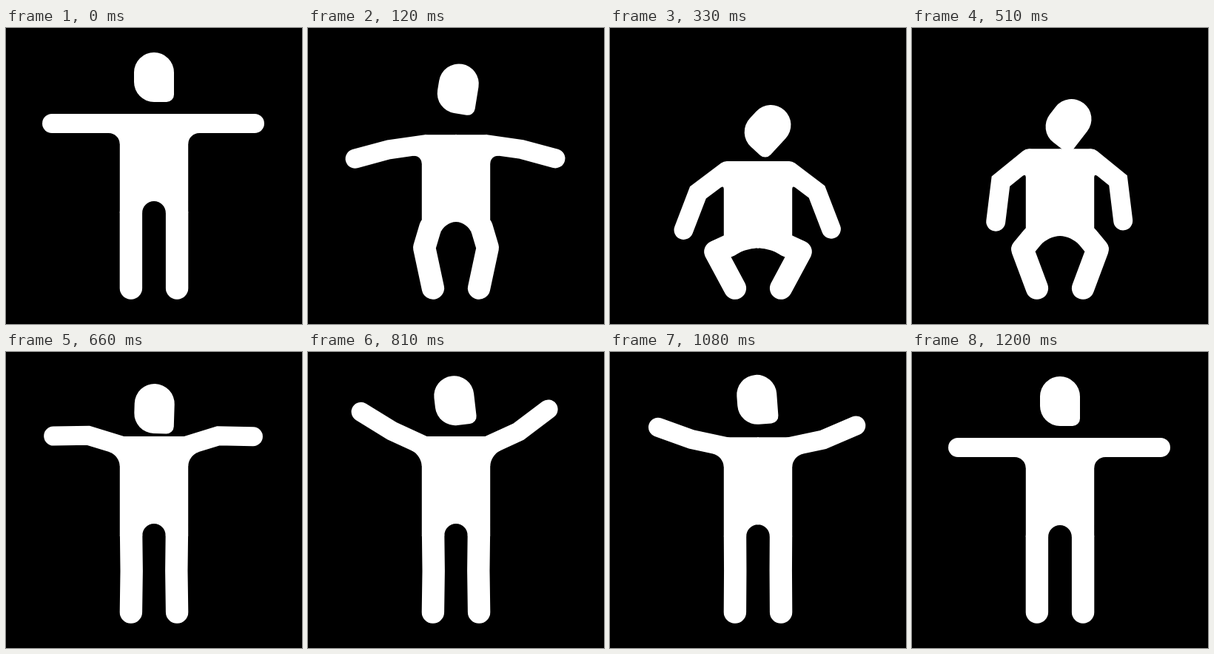
These frames come from a looping animation (400 by 400 pixels, 3.23 s). An HTML page with a canvas:

```html
<!DOCTYPE html>
<html lang="en">
<head>
<meta charset="utf-8">
<title>Jumping figure</title>
<style>
  html, body { margin: 0; width: 100%; height: 100%; overflow: hidden; background: #000; }
  canvas { display: block; width: 400px; height: 400px; }
</style>
</head>
<body>
<canvas id="stage"></canvas>
<script>
const LOOP = 3230, STEP = 30, END = 1200;
const ARM = 26, LEG = 30.4, SHIN = 56;
const SIDE = 153.8, SHOULDER = 158, HIP = 168.9, FOOT = 351.6;

// The motion: stand, crouch, spring up with raised arms, stand. Angles point down when positive.
const times = [0, 210, 330, 510, 660, 960, 1180];
const motion = {
  crouch: [0, 0.83, 1, 0.74, -0.03, -0.03, 0],
  headY: [60, 96, 131, 123, 70, 55, 60],
  upper: [0, 19, 37, 39, -17, -27.5, 0],
  fore: [0, 35, 69, 83, 1, -46, 0]
};

// The arms differ a little in length and in how far they lift.
const left = { upper: 49, lift: 1 };
const right = { upper: 47, lift: 1.17 };

const canvas = document.getElementById("stage");
const ctx = canvas.getContext("2d");
const ratio = window.devicePixelRatio || 1;
canvas.width = canvas.height = 400 * ratio;

const rad = deg => deg * Math.PI / 180;
const clamp = (x, lo, hi) => Math.min(hi, Math.max(lo, x));

function slope(v, i) {
  if (i === 0 || i === v.length - 1) return 0;
  const rate = n => (v[n + 1] - v[n]) / (times[n + 1] - times[n]);
  const a = rate(i - 1), b = rate(i);
  return a * b > 0 ? 2 * a * b / (a + b) : 0;
}

// Smooth curve through the values, without overshoot.
function at(v, t) {
  let i = 0;
  while (i < times.length - 2 && t >= times[i + 1]) i++;
  const span = times[i + 1] - times[i], u = clamp((t - times[i]) / span, 0, 1), w = 1 - u;
  return v[i] * w * w * (1 + 2 * u) + v[i + 1] * u * u * (3 - 2 * u) +
    span * u * w * (w * slope(v, i) - u * slope(v, i + 1));
}

const headShape = new Path2D(
  "M-27 0A27 27 0 0 1 27 0V30A10 10 0 0 1 17 40H0A27 27 0 0 1-27 13Z");

function limb(width, join, points) {
  ctx.lineWidth = width;
  ctx.lineJoin = join;
  ctx.beginPath();
  points.forEach(p => ctx.lineTo(...p));
  ctx.stroke();
}

// Near-circular bend from a to b, rounding the corner at c.
function bend(a, c, b) {
  const pull = (p, n) => p[n] + (c[n] - p[n]) * 0.5523;
  ctx.bezierCurveTo(pull(a, 0), pull(a, 1), pull(b, 0), pull(b, 1), ...b);
}

function drawArm(top, upper, fore, side) {
  const a = rad(upper), b = rad(fore < 0 ? fore * side.lift : fore);
  const s = [SHOULDER, top + 13], dx = -Math.cos(a), dy = Math.sin(a);
  const reach = 47 + 8 * Math.sin(b) ** 2;
  const elbow = [s[0] + side.upper * dx, s[1] + side.upper * dy];
  const hand = [elbow[0] - reach * Math.cos(b), elbow[1] + reach * Math.sin(b)];
  limb(ARM, "miter", [s, elbow, hand]);

  // Rounded armpit
  const q = [s[0] + 13 * dy, s[1] - 13 * dx];
  const corner = [SIDE, q[1] + (SIDE - q[0]) / dx * dy];
  const r = clamp(15 - 0.3 * upper, 5, 15);
  const start = [SIDE + r * dx, corner[1] + r * dy], end = [SIDE, corner[1] + r];
  ctx.beginPath();
  ctx.moveTo(...start);
  bend(start, corner, end);
  ctx.lineTo(...s);
  ctx.fill();
}

function drawBody(top, crouch) {
  const crotch = 234 + 63.5 * crouch;
  const hip = [HIP - 8 * crouch, 250 + 44 * crouch];
  const out = 26.5 * crouch;
  const knee = [HIP - out, FOOT - Math.sqrt(SHIN * SHIN - out * out)];
  limb(LEG, "round", [hip, knee, [HIP, FOOT]]);

  // Follow the inner edge of the thigh up to the crotch arch.
  const len = Math.hypot(knee[0] - hip[0], knee[1] - hip[1]);
  const kx = (knee[0] - hip[0]) / len, ky = (knee[1] - hip[1]) / len;
  const edge = [hip[0] + LEG / 2 * ky, hip[1] - LEG / 2 * kx];
  const px = Math.min(188, edge[0] + (crotch - edge[1]) / ky * kx), r = 200 - px;
  const mid = [200, crotch], inner = [px + r * kx, crotch + r * ky];
  ctx.beginPath();
  ctx.moveTo(SHOULDER, top);
  ctx.lineTo(201, top);
  ctx.lineTo(201, crotch);
  ctx.lineTo(...mid);
  bend(mid, [px, crotch], inner);
  ctx.lineTo(...edge);
  ctx.lineTo(...hip);
  ctx.lineTo(SIDE, hip[1] - 8 * crouch);
  ctx.lineTo(SIDE, top + 13);
  ctx.fill();
}

function draw(t) {
  const crouch = at(motion.crouch, t), headY = at(motion.headY, t);
  const upper = at(motion.upper, t), fore = at(motion.fore, t);
  const top = 116 + 64 * crouch;
  const tilt = 0.6 * (headY - 60) + 0.25 * Math.min(0, upper);

  ctx.setTransform(ratio, 0, 0, ratio, 0, 0);
  ctx.fillStyle = "#000";
  ctx.fillRect(0, 0, 400, 400);
  ctx.fillStyle = ctx.strokeStyle = "#fff";
  ctx.lineCap = "round";

  for (const side of [left, right]) {
    ctx.save();
    if (side === right) ctx.transform(-1, 0, 0, 1, 400, 0);
    drawArm(top, upper, fore, side);
    drawBody(top, crouch);
    ctx.restore();
  }

  ctx.translate(200 + 0.41 * tilt, headY);
  ctx.rotate(rad(tilt));
  ctx.fill(headShape);
}

const begin = performance.now();
function tick() {
  const t = (performance.now() - begin) % LOOP;
  draw(Math.min(END, Math.floor(t / STEP) * STEP));
  requestAnimationFrame(tick);
}
tick();
</script>
</body>
</html>
```
